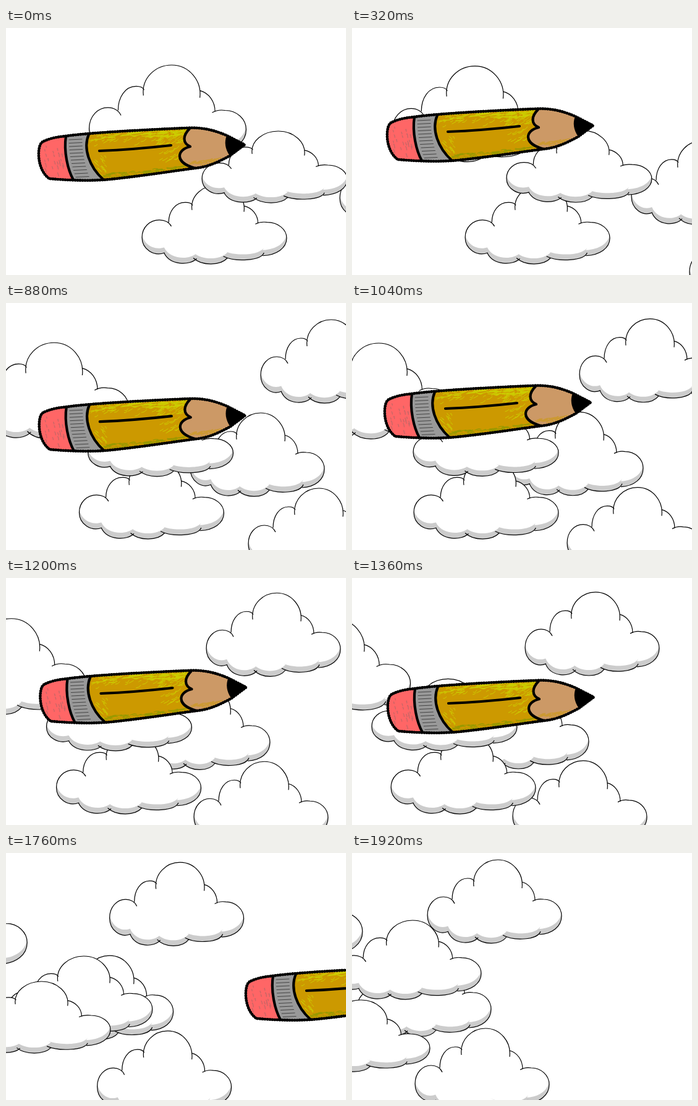
Recreate the animation shown at these times as an HTML page with a canvas. Size 550 px wide and 400 px high, loop 2000 ms.

```html
<!DOCTYPE html>
<html lang="en">
<head>
<meta charset="utf-8">
<title>Flying pencil</title>
<style>
html, body { margin: 0; width: 550px; height: 400px; overflow: hidden; background: #fff; }
canvas { display: block; }
</style>
</head>
<body>
<canvas id="stage" width="550" height="400"></canvas>
<script>
const ctx = document.getElementById('stage').getContext('2d');
const STEP = 80, STEPS = 25;

// Cloud outline on a 217 x 135 box, one entry per puff
const puffs = [
  '34 116C18 123 0 110 0 90C0 72 12 60 26 60C34 60 41 64 44 71',
  '40 64C40 45 50 30 65 30C70 30 74 31 76 35',
  '75 43C72 18 92 0 114 0C138 0 156 22 153 46',
  '153 36C165 39 174 51 174 66',
  '170 67C177 63 182 63 188 64C204 64 217 76 217 91C217 108 202 120 181 121',
  '183 116C178 130 140 132 122 122',
  '128 125C118 138 90 139 77 125',
  '82 126C72 138 42 138 33 116'
];
const outline = new Path2D('M' + puffs.join('M'));
const shape = new Path2D('M' + puffs.join('L') + 'Z');

// Keys are [step, x, y]; clouds are listed back to front
const cloud = (w, h, keys) => {
  const scaled = path => {
    const p = new Path2D();
    p.addPath(path, new DOMMatrix([w / 217, 0, 0, h / 135, 0, 0]));
    return p;
  };
  return { line: scaled(outline), fill: scaled(shape), keys };
};
const small = (dx, dy) => cloud(217, 135,
  [[0, 654, 34.6], [19, 236, 21.5], [24, 122, 11]].map(([s, x, y]) => [s, x + dx, y + dy]));
const clouds = [
  cloud(254, 155, [[0, 134.5, 60], [19, -194, 67.3], [24, -237, 23]]),
  small(-114, 151),
  small(0, 0),
  small(-20, 273),
  cloud(234, 128, [[0, 220, 254], [19, 44.6, 254], [24, -25, 109]]),
  cloud(235, 116, [[0, 317, 167], [19, -1.6, 163], [24, -109, 238]])
];
const flight = [[0, 0, 0], [4, 4, -31], [8, 2, 25], [13, 0, -28], [17, 5, 4],
  [19, 5, 12], [20, 115, 16], [24, 555, 32]];

function at(keys, s) {
  let i = 1;
  while (i < keys.length - 1 && s > keys[i][0]) i++;
  const [s0, x0, y0] = keys[i - 1], [s1, x1, y1] = keys[i];
  const k = (s - s0) / (s1 - s0);
  return [x0 + (x1 - x0) * k, y0 + (y1 - y0) * k];
}

const body = new Path2D('M62 183C73 178 85 176 97 175C130 170 220 165 290 162C318 160 338 166 357 174L386 189L362 207C345 216 328 225 306 227C260 233 205 242 157 246C125 248 95 246 70 244C56 234 52 214 53 200C54 190 56 185 62 183Z');
const barrel = new Path2D('M134 172L297 163C286 174 285 186 298 192C276 197 272 218 306 227L157 245C132 225 124 195 134 172Z');
const eraser = new Path2D('M62 183L97 175C93 200 100 230 109 246L70 244C52 234 50 187 62 183Z');
const ferrule = new Path2D('M97 175L134 172C124 195 135 225 157 245L109 246C100 230 93 200 97 175Z');
const wood = new Path2D('M297 163C318 160 338 166 357 174L386 189L362 207C345 216 328 225 306 227C272 218 276 197 298 192C285 186 286 174 297 163Z');
const lead = new Path2D('M357 174L386 189L362 207C354 196 353 184 357 174Z');
const seams = new Path2D('M97 175C93 200 100 230 109 246M134 172C124 195 135 225 157 245M297 163C286 174 285 186 298 192C276 197 272 218 306 227M151 199Q205 197 267 190');

let seed = 7;
const rnd = (a, b) => {
  seed = (seed * 16807) % 2147483647;
  return a + (b - a) * seed / 2147483647;
};
function scribble(n, x0, x1, y0, y1, dx, dy, slope = 0) {
  const p = new Path2D();
  for (let i = 0; i < n; i++) {
    const x = rnd(x0, x1), y = rnd(y0, y1) + (x - x0) * slope, k = rnd(.4, 1);
    p.moveTo(x, y);
    p.quadraticCurveTo(x + dx * k / 2, y + rnd(-3, 3), x + dx * k, y + dy * k);
  }
  return p;
}
const crayon = [
  [scribble(70, 136, 284, 172, 183, 18, -2, -.06), '#cccc00', 1.3],
  [scribble(38, 136, 290, 183, 197, 9, -5, -.06), '#cccc00', 1],
  [scribble(30, 245, 278, 172, 222, 9, -5), '#cccc00', 1],
  [scribble(30, 140, 160, 205, 240, 5, 5), '#cccc00', 1],
  [scribble(40, 150, 282, 237, 243, 16, -2, -.1), '#999900', 1.2]
];
const rubber = scribble(22, 62, 93, 186, 236, 2, 6);
const ridges = new Path2D();
for (let y = 181; y < 242; y += 5.5) {
  const x = 102 + (y - 181) ** 2 / 330;
  ridges.moveTo(x, y);
  ridges.lineTo(x + 21, y - 1);
}
const grain = scribble(26, 296, 340, 217, 223, 12, -3, -.1);

function paint(path, color) {
  ctx.fillStyle = color;
  ctx.fill(path);
}
function ink(path, color, width) {
  ctx.strokeStyle = color;
  ctx.lineWidth = width;
  ctx.stroke(path);
}
function inside(path, draw) {
  ctx.save();
  ctx.clip(path);
  draw();
  ctx.restore();
}

function drawCloud({ line, fill, keys }, s) {
  ctx.save();
  ctx.translate(...at(keys, s));
  paint(fill, '#ccc');
  inside(fill, () => {
    ctx.translate(0, -9);
    paint(fill, '#fff');
  });
  ink(line, '#000', 1.2);
  ctx.restore();
}

function drawPencil(s) {
  ctx.save();
  ctx.translate(...at(flight, s));
  ctx.lineCap = ctx.lineJoin = 'round';
  paint(barrel, '#cc9900');
  inside(barrel, () => crayon.forEach(c => ink(...c)));
  paint(eraser, '#ff6666');
  inside(eraser, () => ink(rubber, '#cc6666', 1.5));
  paint(ferrule, '#999');
  inside(ferrule, () => ink(ridges, '#444', 1));
  paint(wood, '#cc9966');
  inside(wood, () => ink(grain, '#cc9933', 1.5));
  paint(lead, '#000');
  ink(seams, '#000', 4.2);
  ink(body, '#000', 3.4);
  // beaded edge
  ctx.setLineDash([0, 4]);
  ink(body, '#000', 4.8);
  ctx.restore();
}

function frame(now) {
  const s = Math.floor(now / STEP) % STEPS;
  ctx.fillStyle = '#fff';
  ctx.fillRect(0, 0, 550, 400);
  clouds.forEach(c => drawCloud(c, s));
  drawPencil(s);
  requestAnimationFrame(() => frame(performance.now() - start));
}
const start = performance.now();
frame(0);
</script>
</body>
</html>
```
